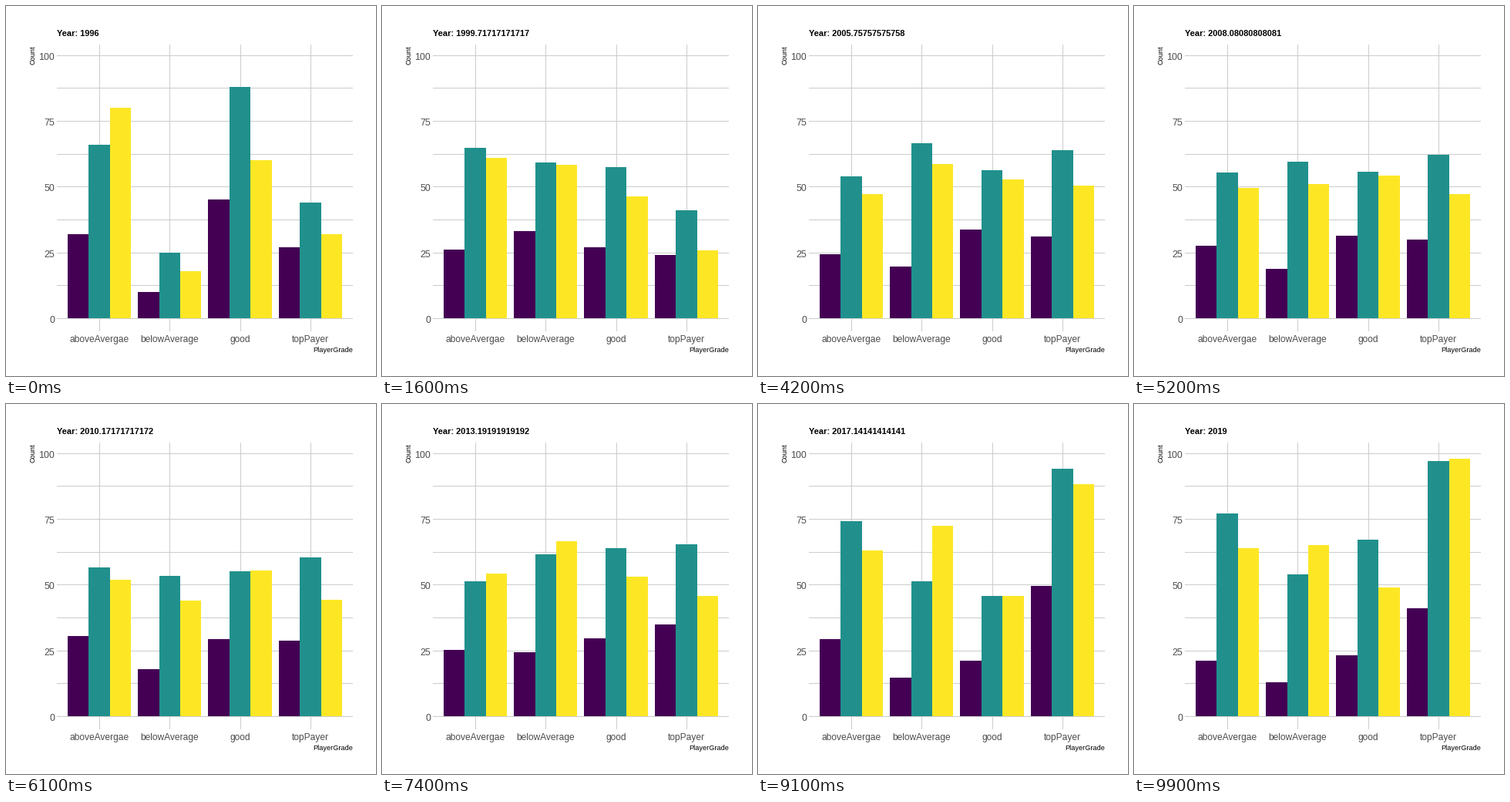
Animation, 480 px wide and 480 px high, one loop 10 s. Source, as a matplotlib script:

```python
import numpy as np
import matplotlib.pyplot as plt
from matplotlib.animation import FuncAnimation
from matplotlib.patches import Rectangle

SIZE, DPI = 480, 100
FRAMES, INTERVAL = 100, 100
FIRST, LAST = 1996, 2019
LEFT, RIGHT, TOP, BOTTOM = 66, 450, 50, 422
STEP = 91.35          # distance between grades
ZERO, UNIT = 404.93, 3.41
BASE = 405
GRID, AXIS_TEXT = "#cccccc", "#4d4d4d"
COLORS = ["#440154", "#21908c", "#fde725"]

# Key points in time, and each grade's three counts there
KEYS = [0, 16, 42, 61, 74, 91, 99]
GRADES = {
    "aboveAvergae": ([32, 26.1, 24.3, 30.5, 25.2, 29.3, 21],
                     [66, 64.8, 54, 56.6, 51.3, 74.2, 77],
                     [80, 61, 47.2, 51.9, 54.3, 63, 64]),
    "belowAverage": ([10, 33.1, 19.6, 17.9, 24.3, 14.7, 13],
                     [25, 59.2, 66.6, 53.4, 61.6, 51.3, 54],
                     [18, 58.4, 58.7, 44, 66.6, 72.4, 65]),
    "good": ([45, 27, 33.7, 29.3, 29.6, 21.1, 23],
             [88, 57.5, 56.3, 55.1, 63.9, 45.7, 67],
             [60, 46.3, 52.8, 55.4, 53.1, 45.7, 49]),
    "topPayer": ([27, 24, 31.1, 28.7, 34.9, 49.6, 41],
                 [44, 41.1, 63.9, 60.4, 65.4, 94.1, 97],
                 [32, 25.8, 50.4, 44.3, 45.7, 88.3, 98]),
}

plt.rcParams["font.family"] = "Liberation Sans"

fig = plt.figure(figsize=(SIZE / DPI, SIZE / DPI), dpi=DPI, facecolor="white")
ax = fig.add_axes([0, 0, 1, 1])
ax.set_xlim(0, SIZE)
ax.set_ylim(SIZE, 0)
ax.axis("off")


def box(x, y, w, h, color, z=1):
    return ax.add_patch(Rectangle((x, y), w, h, facecolor=color, linewidth=0,
                                  antialiased=False, zorder=z))


def label(x, y, text, px, color="black", **kw):
    return ax.text(x, y, text, fontsize=px * 72 / DPI, color=color,
                   va="baseline", **kw)


def ease(frame):
    """Players change grade slowly at first; later legs are linear."""
    first = KEYS[1]
    return first * (frame / first) ** 2.5 if frame < first else frame


for value in np.arange(0, 101, 12.5):
    row = int(405.35 - UNIT * value)
    box(LEFT, row, RIGHT - LEFT, 1, GRID)
    if value % 25 == 0:
        label(63, row + 6, f"{value:.0f}", 12.4, AXIS_TEXT, ha="right")

bars = []
for i, (grade, series) in enumerate(GRADES.items()):
    center = 66.06 + STEP * (0.6 + i)
    box(round(center), TOP, 1, BOTTOM - TOP, GRID)
    label(center, 436, grade, 12, AXIS_TEXT, ha="center")
    edges = [round(center + STEP * 0.3 * (k - 1.5)) for k in range(4)]
    for x0, x1, color, counts in zip(edges, edges[1:], COLORS, series):
        bars.append((box(x0, BASE, x1 - x0, 0, color, z=2), counts))

label(RIGHT, 449, "PlayerGrade", 9.2, ha="right")
label(38, 51, "Count", 9.2, ha="right", rotation=90, rotation_mode="anchor")
title = label(LEFT, 39, "", 11, weight="bold")


def update(frame):
    year = FIRST + (LAST - FIRST) * frame / (FRAMES - 1)
    title.set_text(f"Year: {year:.15g}")
    for bar, counts in bars:
        count = np.interp(ease(frame), KEYS, counts)
        top = round(ZERO - UNIT * count)
        bar.set_y(top)
        bar.set_height(BASE - top)
    return [title] + [bar for bar, _ in bars]


anim = FuncAnimation(fig, update, frames=FRAMES, interval=INTERVAL,
                     repeat=True, repeat_delay=0)
plt.show()
```
